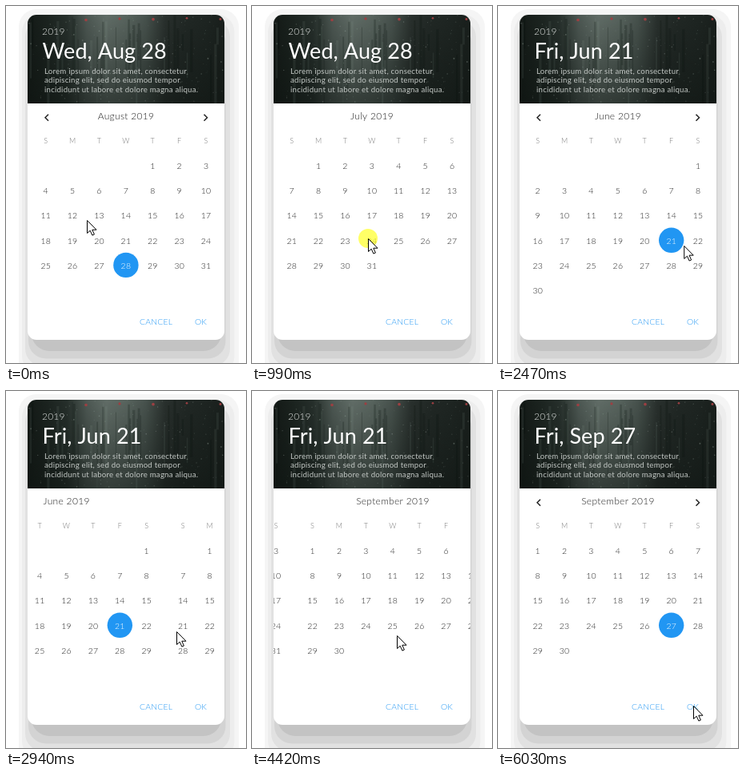
Recreate the animation shown at these times as an HTML page with a canvas. Size 300 by 447 pixels, loop 6110 ms.

```html
<!DOCTYPE html>
<html lang="en">
<head>
<meta charset="utf-8">
<title>Date picker</title>
<style>
html, body { margin: 0; width: 100%; height: 100%; overflow: hidden; background: #fff; }
canvas { display: block; width: 300px; height: 447px; }
</style>
</head>
<body>
<canvas id="stage"></canvas>
<script>
const W = 300, H = 447, LOOP = 6110, STEPS = 79;
const CARD = { x: 27, y: 11, w: 246, bottom: 418, fold: 122, r: 11 };
const BLUE = '#2196f3', INK = '#222', FONT = 'Lato, "Open Sans", sans-serif';
const MONTHS = ['June', 'July', 'August', 'September'];
const DAYS = [30, 31, 31, 30];
const dpr = window.devicePixelRatio || 1;

// Times are in steps; page 0 is June
const SWIPES = [
  { at: 2.5, by: -1 }, { at: 14.5, by: -1 },
  { at: 36.5, by: 1 }, { at: 42.75, by: 1 }, { at: 53.25, by: 1 }
];
const CLICKS = [29, 65, 77];
// Pointer stops: [step, x, y]
const STOPS = [
  [0, 101, 268], [10, 278, 286], [13, 145, 291], [20, 255, 293], [24, 239, 291],
  [29, 218, 298], [34, 240, 301], [38, 213, 301], [42, 222, 308], [46, 161, 309],
  [52, 235, 307], [57, 181, 306], [62, 240, 308], [66, 217, 300], [69, 217, 300], [76, 244, 394]
];

// Quick fling that settles softly
const fling = u => u <= 0 ? 0 : 1 - Math.exp(-((u / 2.5) ** 2));
const pageAt = n => SWIPES.reduce((p, s) => p + s.by * fling(n - s.at), 2);
const swiping = (n, tail) => SWIPES.some(s => n >= s.at - 1.5 && n < s.at + tail);
const pressedAt = n => swiping(n, 1) || CLICKS.includes(n);

function pointerAt(n) {
  const i = STOPS.findIndex(s => s[0] > n);
  if (i < 0) return STOPS[STOPS.length - 1].slice(1);
  const [t0, x0, y0] = STOPS[i - 1], [t1, x1, y1] = STOPS[i];
  const u = (n - t0) / (t1 - t0), e = u * u * (3 - 2 * u);
  return [x0 + (x1 - x0) * e, y0 + (y1 - y0) * e];
}

function setup(canvas) {
  canvas.width = W * dpr;
  canvas.height = H * dpr;
  const g = canvas.getContext('2d');
  g.scale(dpr, dpr);
  return g;
}

function fillBox(g, left, top, right, bottom, r, color) {
  g.fillStyle = color;
  g.beginPath();
  g.roundRect(left, top, right - left, bottom - top, r);
  g.fill();
}

function disc(g, x, y, r, color) {
  g.fillStyle = color;
  g.beginPath();
  g.arc(x, y, r, 0, Math.PI * 2);
  g.fill();
}

function text(g, str, x, y, size, color, align = 'center', space = .2, weight = 300) {
  g.font = `${weight} ${size}px ${FONT}`;
  g.letterSpacing = space + 'px';
  g.textAlign = align;
  g.fillStyle = color;
  g.fillText(str, x, y);
}

function paintBackdrop(g) {
  const right = CARD.x + CARD.w, r = CARD.r;
  g.fillStyle = '#fff';
  g.fillRect(0, 0, W, H);
  for (let i = 0; i < 5; i++) {
    const v = 245 - 7 * i - 1.4 * i * i;
    fillBox(g, 16 + 4 * i, 4 + 6.5 * i, 291 - 5.5 * i, 470 - 9.5 * i, 22, `rgb(${v},${v},${v})`);
  }
  fillBox(g, CARD.x, CARD.fold, right, CARD.bottom, [0, 0, r, r], '#fff');
  paintRain(g, right);
  text(g, 'CANCEL', 187.5, 399, 10.4, BLUE);
  text(g, 'OK', 243.5, 399, 10.4, BLUE);
}

// Dark rainy window behind the heading
function paintRain(g, right) {
  let seed = 11;
  const rnd = () => (seed = seed * 16807 % 2147483647) / 2147483647;
  const anyX = () => CARD.x + rnd() * CARD.w;
  const across = g.createLinearGradient(CARD.x, 0, right, 0);
  ['#141a17', '#1c2420', '#27302c', '#505b56', '#65716b', '#5c6862', '#4a5550', '#2a312e', '#222926', '#1f2623', '#1a201d']
    .forEach((c, i, all) => across.addColorStop(i / (all.length - 1), c));
  const down = g.createLinearGradient(0, CARD.y, 0, CARD.fold);
  down.addColorStop(0, 'rgba(12,18,15,.05)');
  down.addColorStop(1, 'rgba(12,18,15,.55)');
  for (const paint of [across, down]) {
    fillBox(g, CARD.x, CARD.y, right, CARD.fold, [CARD.r, CARD.r, 0, 0], paint);
  }
  g.save();
  g.clip();
  for (let i = 0; i < 36; i++) {
    g.fillStyle = rnd() < .6 ? 'rgba(8,14,11,.22)' : 'rgba(150,170,160,.1)';
    g.fillRect(anyX(), CARD.y + rnd() * 50, .8 + rnd() * 2.5, 20 + rnd() * 70);
  }
  for (let i = 0; i < 200; i++) {
    disc(g, anyX(), CARD.y + rnd() * 111, .3 + rnd() * .6, `rgba(190,205,195,${.08 + rnd() * .25})`);
  }
  for (let x = 100; x < right; x += 42) disc(g, x, 15 + rnd() * 3, 1.3 + rnd() * .6, '#9c3f42');
  g.restore();
}

function drawHeading(date) {
  text(ctx, '2019', 45, 36, 12, '#e4e7e5', 'left');
  text(ctx, date, 45.5, 66, 27, '#fff', 'left', .1, 400);
  ['Lorem ipsum dolor sit amet, consectetur',
   'adipiscing elit, sed do eiusmod tempor',
   'incididunt ut labore et dolore magna aliqua.'
  ].forEach((line, i) => text(ctx, line, 48, 84.5 + i * 11.7, 9.7, '#c3c8c5', 'left', .2, 400));
}

function drawMonth(m, dx, picked) {
  const colX = c => 49.7 + c * 33.4 + dx;
  text(ctx, MONTHS[m] + ' 2019', 150 + dx, 142.3, 12, INK, 'center', .3);
  [...'SMTWTFS'].forEach((d, c) => text(ctx, d, colX(c), 171.5, 9, '#777'));
  const first = new Date(2019, m + 5, 1).getDay();
  for (let d = 1; d <= DAYS[m]; d++) {
    const cell = first + d - 1;
    const x = colX(cell % 7), y = 200.2 + Math.floor(cell / 7) * 31.1;
    const on = picked[0] === m && picked[1] === d;
    const today = m === 2 && d === 28;
    if (on) disc(ctx, x, y - .2, 15.7, BLUE);
    text(ctx, d, x, y + 4, 10.5, on ? '#fff' : today ? BLUE : INK);
  }
}

function drawArrows() {
  ctx.strokeStyle = INK;
  ctx.lineWidth = 1.5;
  for (const [x, s] of [[51, -1], [249.5, 1]]) {
    ctx.beginPath();
    for (const k of [-1, 0, 1]) ctx.lineTo(x + s * (2 - 4 * Math.abs(k)), 139.8 + 4 * k);
    ctx.stroke();
  }
}

function drawPointer(x, y, pressed) {
  if (pressed) disc(ctx, x, y, 12, 'rgba(255,255,30,.68)');
  const shape = [[0, 0], [0, 16], [3.7, 12.7], [6.4, 18.6], [8.9, 17.5], [6.3, 11.7], [11.5, 11.7]];
  ctx.beginPath();
  shape.forEach(([px, py]) => ctx.lineTo(x + .5 + px, y + .5 + py));
  ctx.closePath();
  ctx.fillStyle = '#fff';
  ctx.fill();
  ctx.strokeStyle = '#000';
  ctx.lineWidth = 1;
  ctx.stroke();
}

function draw(ms) {
  // The picture advances in even steps
  const n = Math.min(STEPS - 1, Math.floor((ms % LOOP + 25) * STEPS / LOOP));
  const page = pageAt(n);
  const [date, ...picked] = n <= CLICKS[0] ? ['Wed, Aug 28', 2, 28]
    : n <= CLICKS[1] ? ['Fri, Jun 21', 0, 21] : ['Fri, Sep 27', 3, 27];
  ctx.drawImage(backdrop, 0, 0, W, H);
  drawHeading(date);
  ctx.save();
  ctx.beginPath();
  ctx.rect(CARD.x, CARD.fold, CARD.w, 250);
  ctx.clip();
  MONTHS.forEach((_, m) => {
    const dx = (m - page) * CARD.w;
    if (Math.abs(dx) < CARD.w) drawMonth(m, dx, picked);
  });
  if (!swiping(n, 11)) drawArrows();
  ctx.restore();
  drawPointer(...pointerAt(n), pressedAt(n));
}

const ctx = setup(document.getElementById('stage'));
const backdrop = document.createElement('canvas');
paintBackdrop(setup(backdrop));

const start = performance.now();
function tick() {
  draw(performance.now() - start);
  requestAnimationFrame(tick);
}
tick();
</script>
</body>
</html>
```
